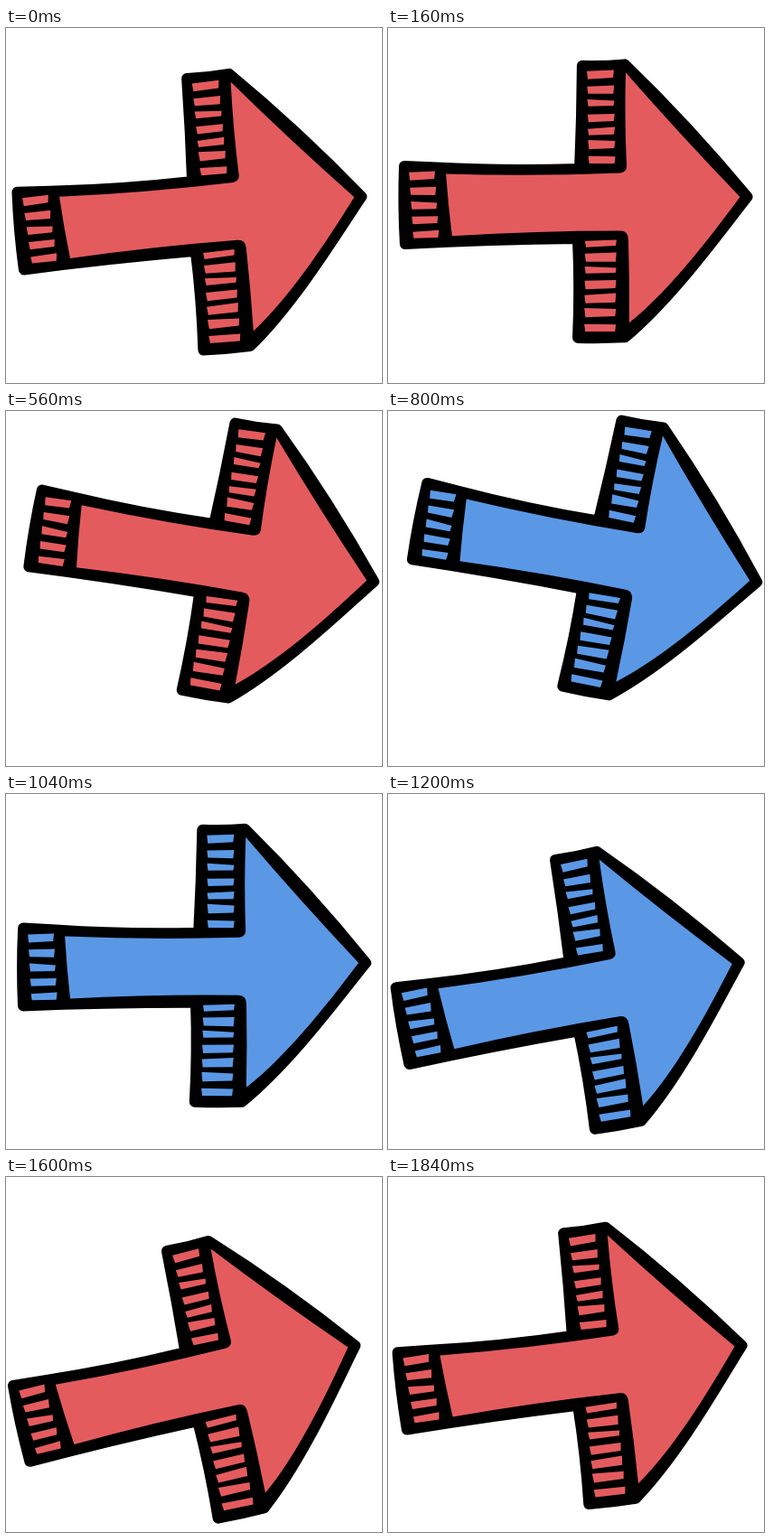
An HTML page for the animation above (1920 ms loop, 416 by 393 pixels).

```html
<!DOCTYPE html>
<html lang="en">
<head>
<meta charset="utf-8">
<title>Swinging arrow</title>
<style>
  html, body { margin: 0; width: 100%; height: 100%; overflow: hidden; background: #fff; }
  svg { display: block; width: 416px; height: 393px; }
</style>
</head>
<body>
<svg viewBox="0 0 416 393">
  <g id="arrow">
    <path stroke="#000" stroke-width="12" stroke-linejoin="round" d="M217 40 Q240 41 264 39 Q334 108 398 187 C371 220 316 296 261 341
      Q236 342 209 341 Q212 286 210 231 Q112 231 19 235 Q17 192 19 149 L55 151 Q130 156 213 154 Q216 98 217 40Z"/>
    <path id="face" d="M265 48 Q324 117 390 187 C365 220 314 288 266 325 Q267 280 266 233 Q266 223 257 223
      Q165 222 71 227 Q67 192 65 158 Q160 162 258 159 Q265 158 265 152 Q263 100 265 48Z"/>
    <path id="cells"/>
  </g>
</svg>
<script>
const FRAME = 80, FRAMES = 24;
const RED = '#e45b5e', BLUE = '#5a98e6';
const PIVOT = '391 241', REST = 1.6;
// Swing angle in degrees, one key every three steps
const KEYS = [-3.4, 3.2, 9.2, 13.9, 6.4, -8.3, -13.7, -8.7];
const arrow = document.getElementById('arrow');

// A column of uneven hatch cells; each pair is a cell's top and bottom
function column(left, right, lean, ...rows) {
  return rows.map(([top, bottom], i) => {
    const x = left + lean * i, r = right + lean * i;
    const a = Math.sin(i * 2.1), b = Math.cos(i * 1.7);
    return `M${x} ${top + a}L${r} ${top - b}L${r - 1} ${bottom - 0.5 + a}L${x + 1} ${bottom + b}Z`;
  }).join('');
}

document.getElementById('cells').setAttribute('d',
  column(222, 252, 0.1, [46, 54], [62, 71], [78, 86], [94, 102], [109, 116], [123, 133], [140, 149]) +
  column(218, 253, -0.3, [234, 240], [247, 257], [263, 271], [278, 287], [293, 302], [309, 319], [326, 335]) +
  column(24, 53, 0.9, [156, 164], [172, 181], [189, 198], [205, 213], [221, 228]));

function angle(step) {
  const i = Math.floor(step / 3), u = step / 3 - i;
  const [a, b, c, d] = [7, 0, 1, 2].map(k => KEYS[(i + k) % 8]);
  return b + u / 2 * (c - a + u * (2 * a - 5 * b + 4 * c - d + u * (3 * (b - c) + d - a)));
}

function draw(now) {
  const step = Math.floor(now / FRAME) % FRAMES;
  arrow.setAttribute('transform', `rotate(${angle(step) - REST} ${PIVOT})`);
  const fill = step >= 8 && step < 19 ? BLUE : RED;
  for (const id of ['face', 'cells']) document.getElementById(id).setAttribute('fill', fill);
}

const start = performance.now();
function tick() {
  draw(performance.now() - start);
  requestAnimationFrame(tick);
}
tick();
</script>
</body>
</html>
```
